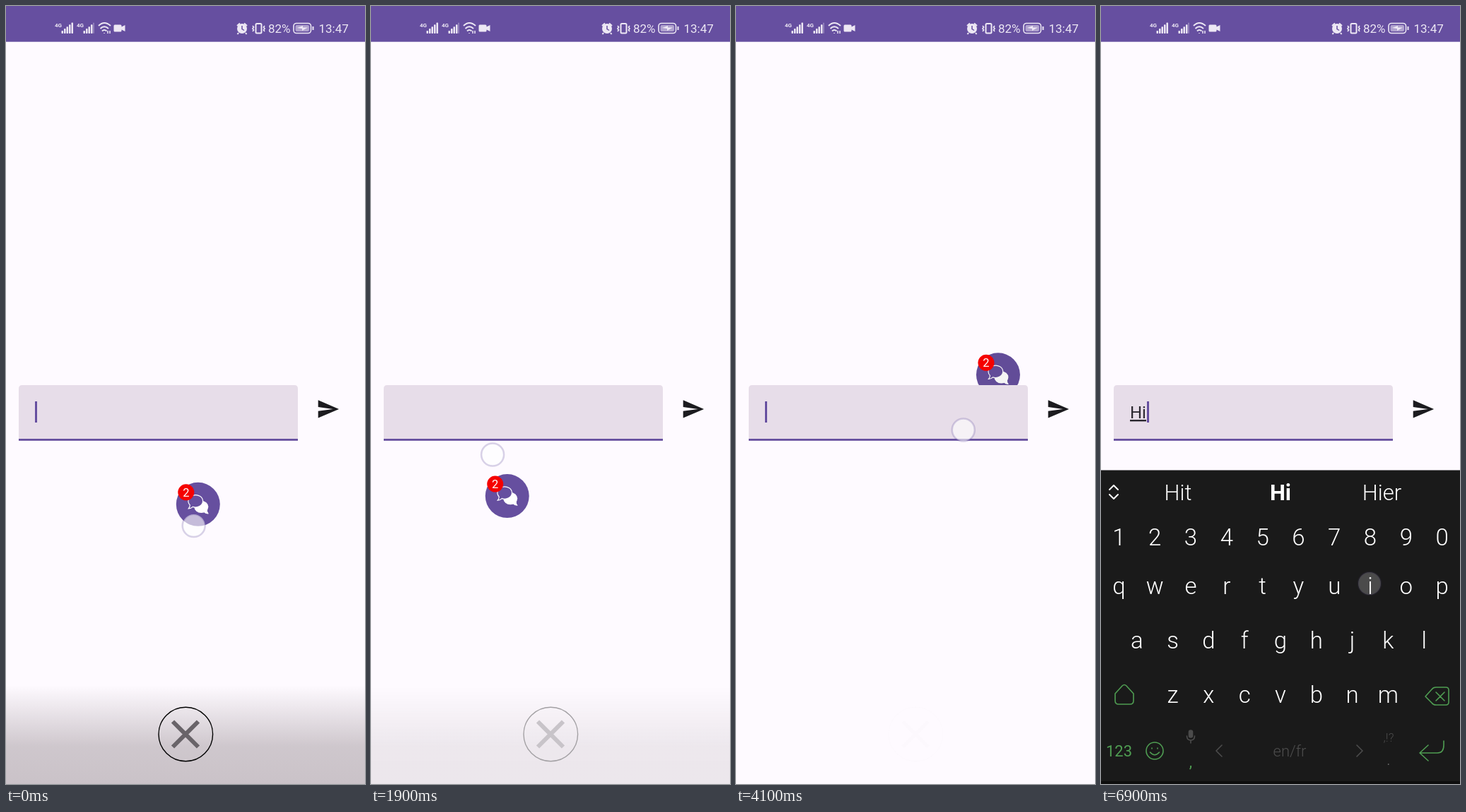
An HTML page that plays this animation: 508x1102 px, repeating every 7000 ms.

```html
<!DOCTYPE html>
<html lang="en">
<head>
<meta charset="utf-8">
<title>Floating chat bubble</title>
<style>
  html, body { margin: 0; width: 100%; height: 100%; overflow: hidden; background: #fefaff; }
  svg { display: block; font-family: Roboto, sans-serif; }
  .status { fill: #ede8f4; }
  .keys { font-size: 33px; font-weight: 300; fill: #fff; text-anchor: middle; }
  .line { fill: none; stroke-width: 1.6; stroke-linecap: round; stroke-linejoin: round; }
  #typed { text-decoration: underline 1px; }
</style>
</head>
<body>
<svg width="508" height="1102" viewBox="0 0 508 1102">
  <defs>
    <linearGradient id="shade" x2="0" y2="1">
      <stop offset="0" stop-color="#1c0810" stop-opacity="0"/>
      <stop offset=".62" stop-color="#1c0810" stop-opacity=".21"/>
      <stop offset="1" stop-color="#1c0810" stop-opacity=".23"/>
    </linearGradient>
  </defs>
  <rect width="508" height="1102" fill="#fefaff"/>

  <g class="status">
    <rect width="508" height="50.700" fill="#664fa0"/>
    <g id="signal"></g>
    <g fill="none" stroke="#ede8f4" stroke-width="2">
      <path d="M131 28Q139 20 148 28M133.500 32Q139 26.500 145 32M136 35.500Q139 32.500 142.500 35.500"/>
      <path d="M139 38v1M144 35v4M147 35v4" stroke-width="1.500"/>
      <path d="M349 28l1.500 2-1.500 2 1.500 2-1.500 2M366 28l-1.500 2 1.500 2-1.500 2 1.500 2" stroke-width="1.700"/>
      <rect x="353.500" y="25" width="8" height="13.500" rx="1.500"/>
      <rect x="407" y="24.500" width="24.500" height="14" rx="4" stroke-width="1.600"/>
      <path d="M434.500 29v5"/>
      <path d="M327 28l4-3.500M341 28l-4-3.500M329 38l-1.500 2M339 38l1.500 2"/>
    </g>
    <path d="M154 26.500h8q1.500 0 1.500 1.500v1.500l5-2.500v9l-5-2.500v1.500q0 1.500-1.500 1.500h-8q-1.500 0-1.500-1.500v-7q0-1.500 1.500-1.500z"/>
    <circle cx="334" cy="32" r="7"/>
    <path d="M334 28v4.500l3 2" fill="none" stroke="#664fa0" stroke-width="1.500"/>
    <rect x="409.500" y="27" width="19.500" height="9" rx="2" opacity=".55"/>
    <path d="M412 31l8-3v2.500h7l-8 4.500v-3z"/>
    <text x="371" y="38" font-size="17">82%</text>
    <text x="442.500" y="38" font-size="17">13:47</text>
  </g>

  <g id="close">
    <rect y="962" width="508" height="140" fill="url(#shade)"/>
    <circle cx="254.300" cy="1031.500" r="38.300" fill="none" stroke="#000" stroke-width="1.400"/>
    <path d="M236 1013.500l36 36m0-36l-36 36" stroke="#696469" stroke-width="6"/>
  </g>

  <g id="bubble">
    <circle r="31" fill="#664f9f"/>
    <ellipse cx="4.500" cy="3.500" rx="10" ry="8.700" fill="#fff"/>
    <path d="M8 11q2.500 3 7 2.500q-2.500-3-2-6z" fill="#fff"/>
    <path d="M-11.500 1A10.300 8.700 0 1 1-7.500 3.500Q-10 6-13.500 6Q-11.500 4-11.500 1z" fill="#664f9f" stroke="#fff" stroke-width="1.200"/>
    <circle id="press" r="31"/>
    <circle cx="-17" cy="-17" r="11.500" fill="#f50000"/>
    <text x="-17" y="-11" font-size="16.500" fill="#fff" text-anchor="middle">2</text>
  </g>

  <path d="M18 613v-71q0-5 5-5h385q5 0 5 5v71z" fill="#e7dde9"/>
  <rect x="18" y="613" width="395" height="2.800" fill="#664f9f"/>
  <path d="M441.700 583.500l29.400-12.600-29.400-12.600v9.800l21 2.800-21 2.800z" fill="#1c1b1f"/>
  <text id="typed" x="41" y="584" font-size="24" fill="#2b2830"></text>
  <rect id="cursor" y="560" width="3" height="30" fill="#664fa0"/>

  <g id="keyboard">
    <rect y=".5" width="508" height="446" fill="#1a1a1a"/>
    <path class="line" d="M12 28l6-6 6 6M12 35l6 6 6-6" stroke="#fff" style="stroke-width:2"/>
    <g class="keys" id="keys">
      <g id="hints" font-size="31">
        <text x="109" y="43"></text>
        <text x="254" y="43" font-weight="600"></text>
        <text x="397.500" y="43"></text>
      </g>
      <g font-size="22">
        <text x="25.500" y="406" fill="#4f9d52" font-weight="400">123</text>
        <text x="267" y="406" fill="#4c4c4c">en/fr</text>
        <text x="407" y="385" fill="#4c4c4c" font-size="17">,!?</text>
        <text x="127" y="421" fill="#4f9d52" font-weight="400">,</text>
        <text x="407" y="418" fill="#777">.</text>
      </g>
    </g>
    <g class="line" stroke="#4f9d52">
      <path d="M20 317L30 306q3-3 6 0L46 317v10q0 5-5 5H25q-5 0-5-5z"/>
      <path d="M459 321l9-10q2-3 6-3h14q4 0 4 4v17q0 4-4 4h-14q-4 0-6-3zM474 315l12 12m0-12l-12 12"/>
      <circle cx="76" cy="398" r="12"/>
      <path d="M72 394v1M80 394v1M69.500 400q6.500 7.500 13 0"/>
      <path d="M485 384v6q0 11-9 11h-25M463 390l-12 11 12 11"/>
    </g>
    <g class="line" stroke="#4c4c4c">
      <path d="M171 390l-8 8 8 8M362 390l8 8-8 8M121.500 377q0 6 5.500 6t5.500-6M127 383v4"/>
      <rect x="124.500" y="369" width="5" height="10" rx="2.500" fill="#4c4c4c"/>
    </g>
  </g>
  <rect id="navbar" y="1098" width="508" height="4"/>
  <circle id="touch" r="16" fill="#fff" fill-opacity=".62" stroke="#664fa0" stroke-opacity=".25" stroke-width="2.500"/>
</svg>
<script>
const LOOP = 7000, STEP = 100, BLINK = 500;
const LAG = 80, SETTLE = 500, FADE = 200, APPEAR = 100;
const $ = id => document.getElementById(id);
const clamp = v => Math.min(1, Math.max(0, v));
const easeOut = u => 1 - (1 - clamp(u)) ** 3;

function add(parent, tag, attrs, text = "") {
  const el = document.createElementNS("http://www.w3.org/2000/svg", tag);
  for (const name in attrs) el.setAttribute(name, attrs[name]);
  el.textContent = text;
  return parent.appendChild(el);
}

// The finger runs along a quadratic curve; on release the bubble glides to "rest"
const drag = (start, release, path, rest, hold = 0) => ({ start, release, path, rest, hold });
const tap = (time, x, y) => drag(time, time, [[x, y], [x, y], [x, y]]);
const gestures = [
  drag(-200, 500, [[296, 652], [199, 824], [410, 822]], [477, 842]),
  drag(1300, 2000, [[477, 842], [198, 878], [155, 549]], [31, 467]),
  drag(2800, 3000, [[31, 467], [130, 462], [250, 455]], [477, 446]),
  drag(3890, 4375, [[477, 446], [249, 530], [246, 1050]], [254, 1031], 395),
  tap(5730, 270, 569),
  tap(6470, 305, 897),
  tap(6770, 380, 818)
];

function finger({ start, release, path: [a, b, c] }, t) {
  const u = clamp((t - start) / (release - start || 1)), v = 1 - u;
  return a.map((p, i) => v * v * p + 2 * u * v * b[i] + u * u * c[i]);
}

// Follows the finger with a delay, then glides to its resting place
function bubbleAt(g, t) {
  const held = finger(g, Math.min(t, g.release) - LAG), u = easeOut((t - g.release) / SETTLE);
  return held.map((p, i) => p + (g.rest[i] - p) * u);
}

for (const [x, bars] of [[69, 5], [100, 4]]) {
  add($("signal"), "text", { x, y: 30, "font-size": 8, "font-weight": 700 }, "4G");
  for (let i = 0; i < 5; i++) {
    const height = 4 + 2.9 * i;
    add($("signal"), "rect", { x: x + 9.5 + 3.5 * i, y: 39 - height, width: i < bars ? 2.5 : 1,
      height, rx: .8, opacity: i < bars ? 1 : .6 });
  }
}

// Rows are centred, except that the digits sit a little closer to the letters
const PITCH = 50.8;
const letters = ["1234567890", "QWERTYUIOP", "ASDFGHJKL", "ZXCVBNM"].flatMap((row, r) =>
  [...row].map((char, i) => {
    const x = 254 + PITCH * (i - (row.length - 1) / 2), y = r ? 99 + 77 * r : 107;
    return [add($("keys"), "text", { x, y }, char), char];
  }));

const stages = [
  { from: 0, text: "", caret: 41, hints: ["Je", "Hhh", "Hhhh"] },
  { from: 6600, text: "H", caret: 58, hints: ["Ha", "H", "He"] },
  { from: 6900, text: "Hi", caret: 65, hints: ["Hit", "Hi", "Hier"] }
];

function draw(t) {
  const show = (id, opacity) => $(id).setAttribute("opacity", opacity);
  const move = (id, x, y) => $(id).setAttribute("transform", `translate(${x} ${y})`);

  const touch = gestures.findLast(g => t >= g.start - APPEAR);
  const [x, y] = finger(touch, t);
  const alpha = Math.min(clamp((t - touch.start) / APPEAR + 1),
    clamp((touch.release + touch.hold + FADE - t) / FADE));
  move("touch", x, y);
  show("touch", alpha);
  show("close", touch.rest ? alpha * clamp((y - 600) / 100) : 0);

  const held = gestures.findLast(g => g.rest && t >= g.start);
  move("bubble", ...bubbleAt(held, t));
  show("bubble", t < 4700 ? 1 : 0);
  show("press", held.start < 0 ? 0 : .15 * clamp(1 - (t - held.start) / 300));

  const opened = easeOut((t - 5800) / 290);
  move("keyboard", 0, 1102 - 445 * opened);
  show("navbar", opened ? .45 : 0);

  const stage = stages.findLast(s => t >= s.from);
  $("typed").textContent = stage.text;
  $("cursor").setAttribute("x", stage.caret);
  show("cursor", stage.text || Math.floor(t / BLINK) % 2 === 0 ? 1 : 0);
  stage.hints.forEach((hint, i) => $("hints").children[i].textContent = hint);
  for (const [el, char] of letters) el.textContent = stage.text ? char.toLowerCase() : char;
}

const began = performance.now();
function tick() {
  const t = (performance.now() - began) % LOOP;
  draw(Math.floor(t / STEP) * STEP);
  requestAnimationFrame(tick);
}
tick();
</script>
</body>
</html>
```
